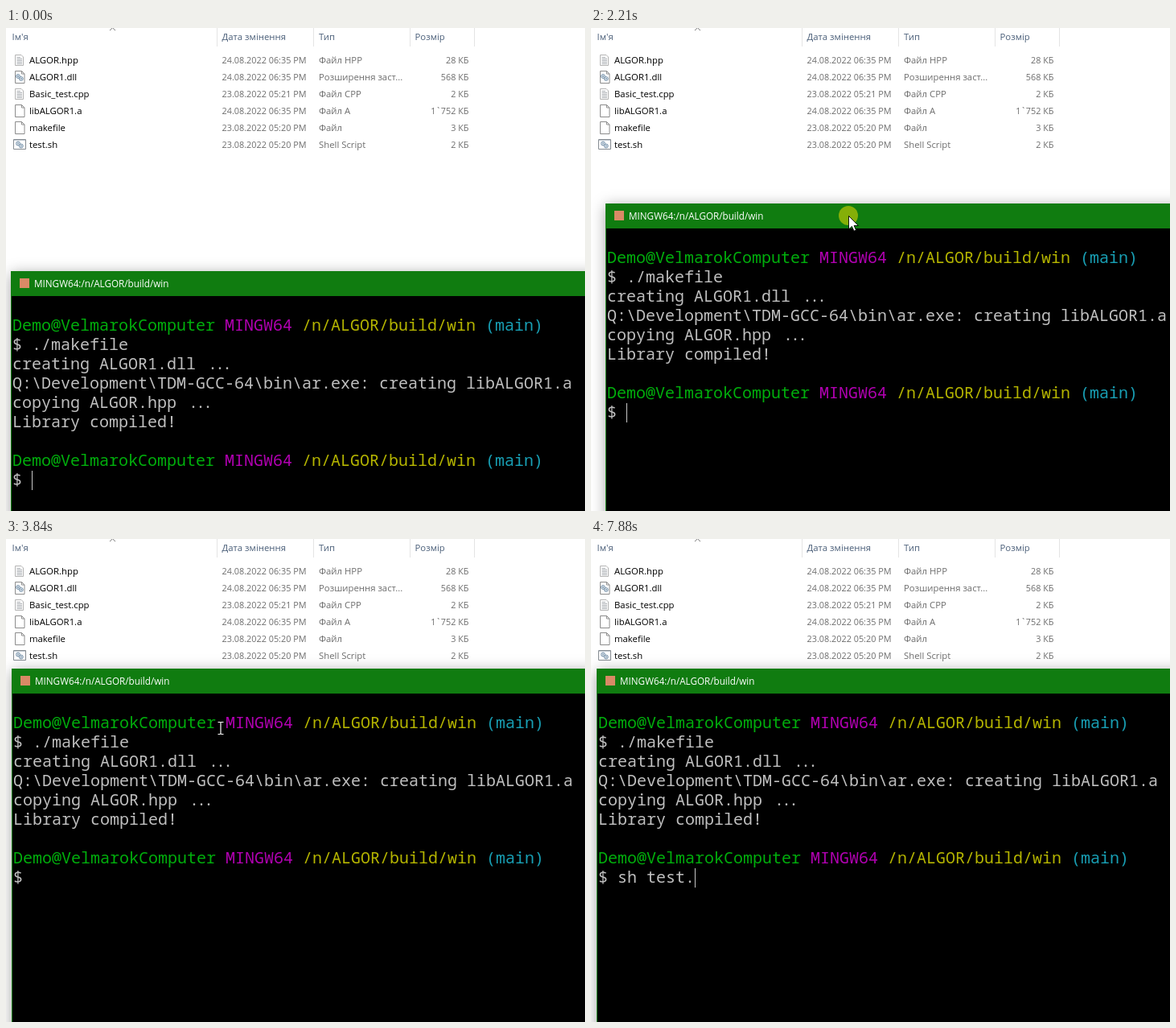
Write an HTML page that moves like this. It is 720 by 600 pixels and loops after 8000 ms.

```html
<!DOCTYPE html>
<html lang="uk">
<head>
<meta charset="utf-8">
<title>Terminal</title>
<style>
html, body { margin: 0; width: 100%; height: 100%; overflow: hidden; background: #fff; }
#stage { position: relative; width: 720px; height: 600px; overflow: hidden; background: #fff; }
svg { position: absolute; left: 0; top: 0; overflow: visible; }
text { white-space: pre; }
#files { font: 11.35px "Open Sans", "Noto Sans", sans-serif; fill: #6d6d6d; }
#files .head { fill: #4c607a; }
#files .name { fill: #000; }
#files .num { font-size: 10.85px; }
#win {
  position: absolute; left: 0; top: 0; width: 800px; height: 700px;
  background: #000; box-shadow: 0 3px 17px rgba(0, 0, 0, .36);
}
#title { font: 11.7px "Open Sans", "Noto Sans", sans-serif; fill: #fff; }
#term { font: 300 20px "Noto Sans Mono", "DejaVu Sans Mono", monospace; fill: #bfbfbf; }
.host { fill: #00ae0c; }
.sys { fill: #b000b0; }
.path { fill: #b4b400; }
.branch { fill: #189fb4; }
</style>
</head>
<body>
<div id="stage">
  <svg width="720" height="600">
    <defs>
      <g id="page">
        <path d="M.5 .5H8.5L12 4V15.5H.5Z" fill="#fff" stroke="#8c8c8c"/>
        <path d="M8.5 .5V4H12" fill="none" stroke="#8c8c8c"/>
      </g>
      <g id="doc">
        <path d="M.5 .5H8L10.5 3V13.5H.5Z" fill="#fdfdfd" stroke="#b4b4b4"/>
        <path d="M2.5 3.5H7M2.5 5.5H9M2.5 7.5H9M2.5 9.5H9M2.5 11.5H9" stroke="#a9adb2"/>
      </g>
      <g id="gears" fill="#eef3f7" stroke="#6f8ca6">
        <circle cx="3" cy="3" r="2.4"/>
        <circle cx="6.8" cy="6" r="2.4"/>
        <circle cx="3" cy="3" r=".6"/>
        <circle cx="6.8" cy="6" r=".6"/>
      </g>
    </defs>
    <path d="M262.5 0V23M382.5 0V23M502.5 0V23M582.5 0V23" stroke="#e4e4e4"/>
    <path d="M129 3.2L132.5 -.3L136 3.2" fill="none" stroke="#777"/>
    <use href="#doc" x="11" y="33"/>
    <use href="#page" x="11" y="53"/>
    <use href="#gears" x="12" y="57"/>
    <use href="#doc" x="11" y="75"/>
    <use href="#page" x="11" y="95"/>
    <use href="#page" x="11" y="116"/>
    <path d="M9.5 138.5H24.5V150.5H9.5Z" fill="#fff" stroke="#858b91"/>
    <path d="M10 139.5H24" stroke="#c3cbd3"/>
    <use href="#gears" x="12" y="140.5"/>
    <g id="files"></g>
  </svg>
  <div id="win">
    <svg width="800" height="700">
      <path d="M0 0H800V31H1V700H0Z" fill="#107c10"/>
      <rect x="11" y="9" width="12" height="12" fill="#d98a66"/>
      <text id="title" x="29" y="19.5">MINGW64:/n/ALGOR/build/win</text>
      <g id="term"></g>
      <rect id="caret" y="248" width="1" height="24" fill="#c8c8c8"/>
    </svg>
  </div>
  <svg width="720" height="600">
    <g id="mouse">
      <circle id="press" r="12" fill="rgba(250,226,0,.5)"/>
      <path id="arrow" d="M.5 .5V17L4.4 13.4L7 19.2L9.6 18.1L7.1 12.5H12.4Z" fill="#fff" stroke="#000" stroke-width=".9"/>
      <g id="beam" fill="none">
        <path d="M-3.5 -7.5H-1L0 -6.7L1 -7.5H3.5M0 -6.7V6.7M-3.5 7.5H-1L0 6.7L1 7.5H3.5" stroke="#000" stroke-width="2.4"/>
        <path d="M-3.5 -7.5H-1L0 -6.7L1 -7.5H3.5M0 -6.7V6.7M-3.5 7.5H-1L0 6.7L1 7.5H3.5" stroke="#fff" stroke-width="1.2"/>
      </g>
    </g>
  </svg>
</div>
<script>
const LOOP = 8000, TICK = 67.1, CELL = 12, LINE = 24;
const el = id => document.getElementById(id);
const [win, caret, mouse, press, arrow, beam] =
  ['win', 'caret', 'mouse', 'press', 'arrow', 'beam'].map(el);

function addText(parent, x, y, str, cls = '', anchor = 'start') {
  const node = document.createElementNS('http://www.w3.org/2000/svg', 'text');
  node.setAttribute('x', x);
  node.setAttribute('y', y);
  node.setAttribute('class', cls);
  node.setAttribute('text-anchor', anchor);
  node.textContent = str;
  el(parent).append(node);
  return node;
}

// File list
[[7.5, "Ім'я"], [268.5, 'Дата змінення'], [389, 'Тип'], [508.5, 'Розмір']]
  .forEach(([x, s]) => addText('files', x, 15, s, 'head'));
[
  ['ALGOR.hpp', '24.08.2022 06:35 PM', 'Файл HPP', '28 КБ'],
  ['ALGOR1.dll', '24.08.2022 06:35 PM', 'Розширення заст...', '568 КБ'],
  ['Basic_test.cpp', '23.08.2022 05:21 PM', 'Файл CPP', '2 КБ'],
  ['libALGOR1.a', '24.08.2022 06:35 PM', 'Файл A', '1`752 КБ'],
  ['makefile', '23.08.2022 05:20 PM', 'Файл', '3 КБ'],
  ['test.sh', '23.08.2022 05:20 PM', 'Shell Script', '2 КБ'],
].forEach(([name, date, type, size], i) => {
  const y = 44 + 21 * i;
  addText('files', 29, y, name, 'name');
  addText('files', 268.5, y, date, 'num');
  addText('files', 389, y, type);
  addText('files', 575.5, y, size, 'num', 'end');
});

// Terminal
const put = (row, col, str, cls) =>
  addText('term', 2 + col * CELL, 74 + row * LINE, str, cls);

function prompt(row) {
  put(row, 0, 'Demo@VelmarokComputer', 'host');
  put(row, 22, 'MINGW64', 'sys');
  put(row, 30, '/n/ALGOR/build/win', 'path');
  put(row, 49, '(main)', 'branch');
  put(row + 1, 0, '$');
}

// The three dots sit closer together than the cells
function ellipsis(row, col) {
  const x = 2 + col * CELL;
  put(row, col, '...').setAttribute('x', [3, 12, 21].map(d => x + d).join(' '));
}

prompt(0);
put(1, 2, './makefile');
put(2, 0, 'creating ALGOR1.dll');
ellipsis(2, 20);
put(3, 0, 'Q:\\Development\\TDM-GCC-64\\bin\\ar.exe: creating libALGOR1.a');
put(4, 0, 'copying ALGOR.hpp');
ellipsis(4, 18);
put(5, 0, 'Library compiled!');
prompt(7);
const input = put(8, 2, '');

// Motion keys: time, x, y
const winPath = [
  [1745, 6, 302], [1940, 11, 290], [2080, 16, 255], [2210, 18, 219],
  [2300, 15, 201], [2420, 10, 182], [2550, 5, 166], [2755, 5, 166],
  [2885, 7, 166], [3220, 7, 166], [3288, 7, 165], [3490, 7, 161],
];
const mousePath = [
  [920, 404, 482], [1340, 345, 380], [1670, 309, 321], [1745, 309, 321],
  [1940, 315, 303], [2210, 320, 234], [2420, 313, 201], [2550, 308, 185],
  [2755, 308, 185], [2885, 310, 185], [3288, 310, 184], [3490, 310, 180],
  [3690, 310, 180], [3760, 306, 189], [4030, 145, 383], [4160, 93, 440],
  [4230, 84, 447], [4295, 82, 441], [4430, 82, 441], [4495, 84, 439],
];
const typed = [
  [6230, 's'], [6360, 'sh'], [6630, 'sh '], [7020, 'sh te'],
  [7290, 'sh tes'], [7420, 'sh test'], [7880, 'sh test.'],
];

// Linear position between keys, in whole pixels; q may fall just short of a key
function at(keys, t) {
  const i = keys.findIndex(k => k[0] > t);
  if (i === 0) return keys[0].slice(1);
  if (i < 0) return keys[keys.length - 1].slice(1);
  const a = keys[i - 1], b = keys[i], f = (t - a[0]) / (b[0] - a[0]);
  return [1, 2].map(n => Math.round(a[n] + (b[n] - a[n]) * f));
}

const show = (node, on) => node.setAttribute('visibility', on ? 'visible' : 'hidden');

function draw(t) {
  const q = Math.floor((t + 7) / TICK) * TICK;
  const [wx, wy] = at(winPath, q), [mx, my] = at(mousePath, q);
  win.style.transform = `translate(${wx}px, ${wy}px)`;
  mouse.setAttribute('transform', `translate(${mx} ${my})`);

  const seen = t >= 920 && t < 6300, onTitle = my < wy + 27;
  show(press, t >= 1810 && t < 3710);
  show(arrow, seen && onTitle);
  show(beam, seen && !onTitle);

  const last = typed.filter(k => k[0] <= t).pop();
  const str = last ? last[1] : '';
  if (input.textContent !== str) input.textContent = str;
  caret.setAttribute('x', 26 + str.length * CELL);
  const lit = t < 2320 || str || Math.floor((t - 2320) / 530) % 2 === 1;
  show(caret, lit);
}

function loop(now) {
  draw(now % LOOP);
  requestAnimationFrame(loop);
}
draw(0);
requestAnimationFrame(loop);
</script>
</body>
</html>
```
